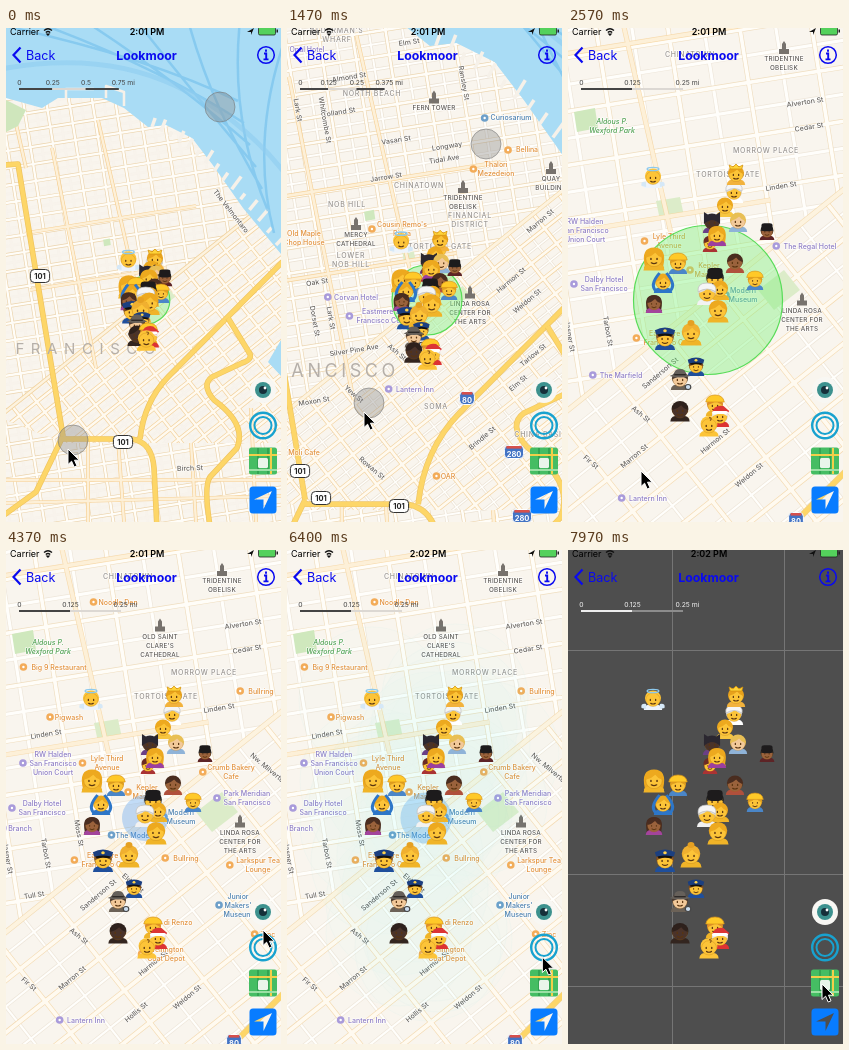
Write an HTML page that moves like this. It is 275x494 px and loops after 8000 ms.

```html
<!DOCTYPE html>
<html lang="en">
<head>
<meta charset="utf-8">
<title>Map pins</title>
<style>
html, body { margin: 0; width: 100%; height: 100%; overflow: hidden; background: #f9f5ee; }
svg { display: block; width: 275px; height: 494px; font-family: Inter, Roboto, "Open Sans", sans-serif; }
.map path { vector-effect: non-scaling-stroke; fill: none; stroke-linejoin: round; }
.map path.area { fill: var(--c); }
.lab text { font-size: 7px; font-weight: 500; text-anchor: middle; paint-order: stroke; stroke: #fffc; stroke-width: 1.4px; stroke-linejoin: round; }
.lab .o { fill: #e2903a; } .lab .p { fill: #8d7cc4; } .lab .s { fill: #66625d; }
.lab .g { fill: #5f5b57; font-size: 6.3px; letter-spacing: .2px; }
.lab .h { fill: #99948f; letter-spacing: .7px; }
.lab .n { fill: #4fa050; font-style: italic; }
.lab .b { fill: #4a7fae; }
.lab .c { fill: #b5afa9; font-size: 15px; letter-spacing: 6.6px; text-anchor: end; stroke: none; font-weight: 400; }
.lab .d { fill: #b5afa9; font-size: 18px; letter-spacing: 3.6px; text-anchor: end; stroke: none; font-weight: 400; }
.lab .shield { font-size: 7.5px; font-weight: 700; stroke: none; }
</style>
</head>
<body>
<svg id="stage" viewBox="0 0 275 494"></svg>
<script>
const stage = document.getElementById('stage');
const LOOP = 8000, CX = 140, CY = 272;

function el(tag, attrs, parent = stage, text) {
  const e = document.createElementNS('http://www.w3.org/2000/svg', tag);
  for (const k in attrs) e.setAttribute(k, attrs[k]);
  if (text !== undefined) e.textContent = text;
  parent.appendChild(e);
  return e;
}
const group = (parent, attrs = {}) => el('g', attrs, parent);
const set = (e, k, v) => e.setAttribute(k, v);
const ramp = (a, b, v) => Math.max(0, Math.min(1, (v - a) / (b - a)));
const about = k => `translate(${CX} ${CY}) scale(${k}) translate(${-CX} ${-CY})`;

// Eased interpolation over rows of [time, ...values]
function track(t, rows) {
  let i = 0;
  while (i < rows.length - 2 && t >= rows[i + 1][0]) i++;
  const [a, b] = [rows[i], rows[i + 1]];
  const u = ramp(a[0], b[0], t), e = u * u * (3 - 2 * u);
  return a.slice(1).map((v, j) => v + (b[j + 1] - v) * e);
}

// ---------- map ----------
const FAR = .32, MID = .47;
const map = group(stage, { class: 'map' });
const roads = [];

function area(d, c, parent) { return el('path', { d, class: 'area', style: `--c:${c}` }, parent); }
function road(d, edge, fill, base, grow, parent, minor) {
  const pair = [el('path', { d, stroke: edge }, parent), el('path', { d, stroke: fill }, parent)];
  roads.push({ pair, base, grow, minor });
}

function northGrid(odd) {
  let d = '';
  for (let k = -26; k < 34; k++) {
    if (!!(k & 1) !== odd) continue;
    const y = 153 + 27 * k, x = 73 + 36 * (k - 2);
    d += `M-330 ${y + 91}L590 ${y - 56}M${x - 141} -600L${x + 113} 990`;
  }
  return d;
}
// Lines along and across the diagonal avenue
function southGrid(odd) {
  let d = '';
  const at = (u, n) => `${(.78 * u + .62 * n).toFixed(1)} ${(.78 * n - .62 * u).toFixed(1)}`;
  for (let k = -20; k < 34; k++) {
    if (!!(k & 1) !== odd) continue;
    const n = 297 + 20.5 * k, u = -182 + 34.5 * k;
    d += `M${at(-900, n)}L${at(700, n)}M${at(u, 290)}L${at(u, 1000)}`;
  }
  return d;
}

const LAND = '#f9f5ee', EDGE = '#ebd3ab', FINE = '#e9dfd0', SOUTH = 'M-320 638L590 -90V719H-116Z';
area('M-900 -900H1200V1400H-900Z', LAND, map);
road(northGrid(true), FINE, '#fffefb', 1, 2.2, map, true);
road(northGrid(false), EDGE, '#fffdf8', 1.7, 2, map);
area(SOUTH, LAND, map);
const clip = el('clipPath', { id: 'south' }, el('defs', {}));
el('path', { d: SOUTH }, clip);
const south = group(map, { 'clip-path': 'url(#south)' });
road(southGrid(true), FINE, '#fffefb', .8, 1.4, south, true);
road(southGrid(false), '#f2cf98', '#fffaf0', 1.9, 2, south);
road('M-320 638L590 -90', '#f0d09a', '#fdf3df', 2, 2.2, map);
area('M6 84l21 -4l3 20l-21 4Z', '#cfe8bd', map);
area('M190 262l26 -20l16 20l-26 20Z', '#dcecc9', map);
area('M88 173l24 -4l4 19l-24 4Z', '#dcecc9', map);

// Streets and shore drawn at the widest zoom
const wide = group(map, { transform: about(1 / FAR) });
road('M10 96L20 140M92 92L128 250M46 120L90 340M20 205L190 178M24 262L160 240M0 452H275M0 475L275 468M82 412V494M112 412L118 494M185 415L190 494M245 380L250 494',
  '#f6cf92', '#fdf0d8', 1.8, 2, wide);
area('M142 83l9 -6l6 9l-8 7Z', '#cfe6bc', wide);
area('M-200 -300H600V520L310 400L275 348L262 334L275 312V226L237 180L206 136L186 110L160 97L142 99L118 80L96 70H52L36 80L0 70L-200 90Z', '#a9dcf5', wide);
area('M0 72L20 82L12 98L0 104Z', '#cfe6bc', wide);
road('M-40 140L12 136L57 408M57 411H126Q146 414 148 440L152 520M57 408L30 464L-20 500M340 170L162 349Q138 374 134 411',
  '#eec25c', '#fdd668', 4, 1, wide);
road('M222 290L244 326Q246 332 236 335L206 349Q195 357 208 372Q241 396 231 420L204 449Q196 460 208 520', '#eec25c', '#fdd668', 4, 1, wide);
let piers = '';
for (let i = 0; i < 15; i++) {
  const u = i / 14, x = 146 + 124 * u, y = 99 + 118 * u * (.5 + .5 * u), r = 9 + 4 * Math.sin(i * 2.3);
  piers += `M${x} ${y}l${r * (.35 + .6 * u)} ${-r}`;
}
el('path', { d: piers, stroke: '#f6f1e9', 'stroke-width': 3.5 }, wide);
el('path', { d: 'M60 70V61H88M100 70V58L118 64V78', stroke: '#f6f1e9', 'stroke-width': 2.5 }, wide);
// Ferry lanes fan out from the shore
let lanes = '';
for (let i = 0; i < 7; i++) lanes += `M${268 - 6 * i} ${205 - 22 * i}Q${238 - 20 * i} ${90 - 12 * i} ${300 - 62 * i} ${-40 + 4 * i}`;
el('path', { d: lanes, stroke: '#7cc4ee', 'stroke-opacity': .75, 'stroke-width': 2.5 }, wide);
el('path', { d: 'M-20 44Q90 20 170 58T300 175', stroke: '#8fcdf0', 'stroke-opacity': .6, 'stroke-width': 5 }, wide);

// ---------- labels: text|x|y|kind|angle ----------
const labelSets = [];
function labels(ref, show, src) {
  const g = group(stage, { class: 'lab' }), items = [];
  for (const row of src.trim().split('\n')) {
    const [text, x, y, kind, rot = 0] = row.trim().split('|');
    const node = group(g), inner = group(node, { transform: `rotate(${rot})` });
    if (kind === 'us' || kind === 'int') {
      const w = text.length * 4.4 + 6, blue = kind === 'int';
      el('rect', { x: -w / 2, y: -6.5, width: w, height: 13, rx: 4, fill: blue ? '#4273c4' : '#fff', stroke: blue ? '#fff' : '#333' }, inner);
      if (blue) el('rect', { x: -w / 2 + 2, y: -6, width: w - 4, height: 2.6, fill: '#d6504c' }, inner);
      el('text', { class: 'shield', y: blue ? 4.5 : 3, fill: blue ? '#fff' : '#222' }, inner, text);
    } else {
      const lines = text.split('/'), top = 2.5 - 4.5 * (lines.length - 1);
      lines.forEach((s, i) => el('text', { class: kind, y: top + 9 * i }, inner, s));
      if (kind === 'g') el('path', { d: `M-5 ${top - 7}v-5h3v-5l2-3l2 3v5h3v5Z`, fill: '#77726d' }, inner);
      if ('opb'.includes(kind)) {
        const w = Math.max(...lines.map(s => s.length)) * 1.85 + 6;
        el('circle', { cx: -w, r: 3.8, fill: { o: '#f3ac59', p: '#a99bdb', b: '#6d9fc9' }[kind] }, inner);
        el('circle', { cx: -w, r: 1.2, fill: '#fff' }, inner);
      }
    }
    items.push({ node, x: (x - CX) / ref, y: (y - CY) / ref });
  }
  labelSets.push({ g, items, show });
}

labels(FAR, (t, s) => 1 - ramp(.355, .40, s), `
FRANCISCO|156|323|c
The Velmontaro|225|183|s|52
Birch St|184|440|s|-2
101|34|248|us
101|117|414|us`);

labels(MID, (t, s) => ramp(.36, .41, s) * (1 - ramp(.6, .72, s)), `
ALDERMAN'S/WHARF|50|7|h
Opal Hotel|20|22|p
Elm St|122|14|s|-9
Almond St|62|49|s|-9
NORTH BEACH|85|66|h
FERN TOWER|147|80|g
Tolland St|52|84|s|-9
Lark St|11|82|s|80
Whitcombe St|38|92|s|80
Vasari St|109|112|s|-9
Ransley St|177|55|s|80
Curiosarium|224|90|b
Bellina|240|122|o
Longway|160|118|s|-9
Tidal Ave|157|131|s|-9
Jarrow St|99|149|s|-9
Thalori/Mezedeion|209|141|o
CHINATOWN|132|158|h
NOB HILL|60|177|h
TRIDENTINE/OBELISK|176|174|g
FINANCIAL/DISTRICT|183|192|h
QUAY/BUILDING|264|155|g
Marron St|253|193|s|-40
Old Maple/Chop House|17|210|o
Cousin Remo's/Pizza|115|201|o
MERCY/CATHEDRAL|69|211|g
TORTOISE GATE|153|219|h
LOWER/NOB HILL|64|232|h
Oak St|30|254|s|-9
Corvan Hotel|69|269|p
Eastmere San/Francisco Centre|98|288|p
Dorset St|28|293|s|80
Lark St|44|290|s|80
Harmon St|224|252|s|-40
Weldon St|240|273|s|-40
Tarlow St|246|327|s|-40
LINDA ROSA/CENTER FOR/THE ARTS|183|284|g
Silver Pine Ave|67|322|s|-9
Ash St|110|324|s|40
Elm St|231|355|s|-40
FRANCISCO|112|346|d
Lantern Inn|128|361|p
Yew St|67|366|s|40
Moxon St|27|373|s|-9
SOMA|149|378|h
Brindle St|195|410|s|-40
CHINA BASIN|254|406|h
Moli Cafe|17|424|o
Rowan St|85|440|s|40
OAR|161|448|o
80|180|370|int
280|227|424|int
280|235|488|int
101|13|443|us
101|34|470|us
101|112|478|us`);

const near = (t, s) => ramp(.72, .9, s);
labels(1, near, `
CHINATOWN|122|26|h
TRIDENTINE/OBELISK|216|35|g
Alverton St|237|74|s|-9
Cedar St|241|99|s|-9
MORROW PLACE|198|122|h
TORTOISE GATE|160|146|h
Linden St|213|158|s|-9
Kepler/Marlowe|141|242|o
Modern/Museum|175|267|b
LINDA ROSA/CENTER FOR/THE ARTS|234|291|g
Tarbot St|40|303|s|80
Jasper St|2|308|s|80
Sanderson St|92|345|s|-40
Ash St|73|386|s|40
Fir St|23|434|s|40
Marron St|66|428|s|-40
Harmon St|147|413|s|-40
Weldon St|181|447|s|-40
Lantern Inn|80|470|p
80|228|491|int`);

labels(1, (t, s) => near(t, s) * (1 - ramp(2650, 3200, t)), `
Aldous P./Wexford Park|44|98|n
RW Halden/San Francisco/Union Court|17|202|p
Dalby Hotel/San Francisco|36|256|p
Lyle Third/Avenue|101|213|o
The Regal Hotel|242|218|p
Eastmere San/Francisco Centre|104|310|o
The Marfield|53|347|p`);

labels(1, t => ramp(2650, 3200, t), `
Aldous P./Wexford Park|42|97|n
Noodle Den|112|52|o
OLD SAINT/CLARE'S/CATHEDRAL|154|95|g
Big 9 Restaurant|53|117|o
Pigwash|63|167|o
Bullring|255|141|o
Linden St|40|184|s|-9
Lyle Third/Avenue|101|213|o
RW Halden/San Francisco/Union Court|47|213|p
Crumb Bakery/Cafe|225|222|o
Nw. Milverton|263|219|s|40
Dalby Hotel/San Francisco|36|258|p
Park Meridian/San Francisco|241|248|p
Branch|14|278|p
Moss St|73|283|s|80
The Modern|130|285|b
Bullring|180|308|o
Eastmere San/Francisco Centre|104|310|o
Larkspur Tea/Lounge|252|315|o
Elder St|127|333|s|40
Tull St|28|345|s|-9
Junior/Makers'/Museum|232|355|b
di Renzo|172|372|o
Zinc|262|384|o
Wellington/Coat Depot|160|404|o
Hollis St|130|462|s|-40`);

// ---------- people ----------
const skinTone = { y: '#fcc438', d: '#4a332a', m: '#9a623c', l: '#f2c99a' };
const people = [
  [85, 150, 1, 'y', '#fcc438', '#eef4fb', 'halo'], [166, 165, 1, 'y', '#ddd', '#fff', 'turban'],
  [168, 147, 1, 'y', '#e8a21c', '#f2b23c', 'crown'], [157, 179, 1, 'y', '#eda91f', '#f7c640', ''],
  [144, 195, 1, 'd', '#2b2730', '#6a3f86', 'cat'], [170, 194, 1, 'l', '#e8bf55', '#8fb3d8', ''],
  [142, 216, .8, 'y', '#6b2b25', '#a33', 'dome'], [149, 208, 1, 'y', '#eda91f', '#9b3fa0', 'long'],
  [199, 204, .8, 'm', '#222', '#5d2426', 'guard'], [86, 231, 1.15, 'y', '#eda91f', '#f0b428', 'long'],
  [110, 236, 1, 'y', '#e0a020', '#4a86c8', 'helmet'], [95, 255, 1, 'y', '#eda91f', '#2d76c8', 'arms'],
  [167, 235, 1, 'm', '#4a2d20', '#b0503c', ''], [187, 253, .9, 'y', '#e0a020', '#4a86c8', 'helmet'],
  [147, 252, 1.1, 'y', '#222', '#b5282d', 'guard'], [152, 262, 1, 'y', '#eda91f', '#f0b428', ''],
  [139, 266, 1.1, 'y', '#ddd', '#f2f2f2', 'turban'], [150, 283, 1.15, 'y', '#eda91f', '#f0b428', ''],
  [86, 276, .9, 'm', '#4a2d20', '#a3449c', 'long'], [97, 311, 1.1, 'y', '#7a4a20', '#1f4f9c', 'police'],
  [123, 306, 1.15, 'y', '#f0b030', '#f0b428', 'bun'], [128, 339, .9, 'y', '#7a4a20', '#1f4f9c', 'police'],
  [112, 352, 1, 'l', '#4a3a30', '#6c6257', 'fedora'], [112, 383, 1.05, 'd', '#2e211c', '#33251f', ''],
  [147, 378, 1, 'y', '#e0902a', '#f0b428', 'helmet'], [152, 389, 1, 'y', '#eee', '#d33', 'santa'],
  [141, 398, 1.05, 'y', '#fcc438', '#fcc438', 'baby']
];
const hats = {
  halo: '<ellipse cy="-9" rx="5" ry="1.6" fill="none" stroke="#8cc9ee" stroke-width="1.4"/><path d="M-6 4q-5-1-4 4l4 1zM6 4q5-1 4 4l-4 1z" fill="#d5e8f7"/>',
  turban: '<path d="M-7-2Q-8-10 0-10T7-2Q0-7-7-2Z" fill="#f5f5f5" stroke="#bbb" stroke-width=".6"/>',
  crown: '<path d="M-5-6l-1-4 3.500 2 2.500-3 2.500 3 3.500-2-1 4Z" fill="#ffd43a" stroke="#d4920c" stroke-width=".7"/>',
  cat: '<path d="M-7 1V-11l4 3h6l4-3V1Q0-7-7 1Z" fill="#2b2730"/>',
  dome: '<path d="M-7-3Q-7-10 0-10T7-3Z" fill="#6b2b25"/>',
  guard: '<rect x="-6" y="-11" width="12" height="10" rx="3" fill="#1d1b1c"/>',
  helmet: '<path d="M-8-4H8Q7-11 0-11T-8-4Z" fill="#ffc928" stroke="#d9941a" stroke-width=".7"/>',
  police: '<path d="M-7-4L-8-8Q0-13 8-8L7-4Z" fill="#1b3f80"/><path d="M-6-4q6-2 12 0l-1 1.500q-5-1-10 0Z" fill="#111"/><circle cy="-7.500" r="1.400" fill="#ffd34d"/>',
  fedora: '<path d="M-9-4Q0-1 9-4L5-6Q5-11 0-11T-5-6Z" fill="#66605a"/><path d="M-5-6h10v1.400H-5Z" fill="#2e2a28"/><circle cx="7" cy="7" r="2.400" fill="#cde" stroke="#444"/>',
  santa: '<path d="M-7-4Q-5-13 3-11L8-6 6-3Z" fill="#dc3535"/><rect x="-7" y="-6" width="14" height="3" rx="1.500" fill="#fff"/>',
  bun: '<circle cy="-9.500" r="2.600" fill="#e5a022"/>',
  arms: '<path d="M-6 8Q-12 2-3-10M6 8Q12 2 3-10" fill="none" stroke="#2d76c8" stroke-width="2.600"/>',
  baby: '<path d="M0-8q3 0 1 3" fill="none" stroke="#8a5a1c"/>'
};
function person(parent, [, , k, skin, hair, shirt, hat]) {
  const g = group(parent), p = group(g, { transform: `scale(${k * 1.15} ${k})` });
  if (hat === 'long') el('path', { d: 'M-7 6Q-10-10 0-10T7 6Q9 9 5 8H-5Q-9 9-7 6Z', fill: hair }, p);
  el('path', { d: 'M-8 10Q-8 4 0 4T8 10Z', fill: shirt }, p);
  el('ellipse', { cy: -2, rx: 7, ry: 7.6, fill: hair }, p);
  el('ellipse', { cy: -.2, rx: 6.2, ry: 6.8, fill: skinTone[skin], stroke: '#a8660e', 'stroke-opacity': .35, 'stroke-width': .6 }, p);
  if (hat !== 'halo' && hat !== 'baby') el('path', { d: 'M-6.3-1Q-6-8.5 0-8.5T6.3-1Q3-2 1-5.5Q-2-2-6.3-1Z', fill: hair }, p);
  el('path', { d: 'M-2.3-.6v1M2.3-.6v1M-2 3.3Q0 4.8 2 3.3', stroke: '#5a3510', 'stroke-width': 1.1, 'stroke-linecap': 'round', fill: 'none' }, p);
  if (hats[hat]) group(p).innerHTML = hats[hat];
  return g;
}

// ---------- overlays ----------
const green = el('circle', { cx: CX, cy: CY, fill: '#78f078', 'fill-opacity': .4, stroke: '#58dc58', 'stroke-width': 1.2 });
const blue = el('circle', { cx: 139, cy: 268, fill: '#5fa4ee', 'fill-opacity': .38 });
const rings = group(stage);
for (const [x, y] of people)
  el('circle', { cx: x, cy: y, r: 73, fill: '#00f6f6', 'fill-opacity': .135, stroke: '#00c4cc', 'stroke-opacity': .45, 'stroke-width': .8 }, rings);
const dark = group(stage);
el('rect', { width: 275, height: 494, fill: '#4e4e4e' }, dark);
el('path', { d: 'M104.5 0V494M216.5 0V494M0 100.5H275M0 324.5H275M0 436.5H275', stroke: '#757575' }, dark);
const pins = people.map(p => person(stage, p));

// ---------- interface ----------
const ui = group(stage), BLUE = '#0a0af0';
const bar = group(ui);
const segs = [0, 1, 2].map(() => el('rect', { y: 60, height: 2 }, bar));
const ticks = [0, 1, 2, 3].map(() => el('text', { y: 57, 'font-size': 6.8, 'text-anchor': 'middle' }, bar));
el('text', { x: 4, y: 7, 'font-size': 9 }, ui, 'Carrier');
el('path', { d: 'M38 2.5Q42-1 46 2.5M39.8 4.5Q42 2.6 44.2 4.5M41.2 6.2L42 7l.8-.8Z', fill: 'none', stroke: '#111', 'stroke-width': 1.3 }, ui);
const clock = el('text', { x: 141, y: 7, 'font-size': 9, 'font-weight': 600, 'text-anchor': 'middle' }, ui);
el('path', { d: 'M241 4L248 0L245 7V4Z', fill: '#111' }, ui);
el('rect', { x: 252.5, y: -1, width: 17, height: 8, rx: 1.5, fill: '#54d15c', stroke: '#222', 'stroke-width': .8 }, ui);
el('rect', { x: 270.5, y: 1.5, width: 1.5, height: 3, fill: '#222' }, ui);
el('path', { d: 'M14.5 19.5L7.5 27L14.5 34.5', fill: 'none', stroke: BLUE, 'stroke-width': 2.2 }, ui);
el('text', { x: 20, y: 32, 'font-size': 12.6, fill: BLUE }, ui, 'Back');
el('text', { x: 140.5, y: 32, 'font-size': 12.3, 'font-weight': 700, fill: BLUE, 'text-anchor': 'middle' }, ui, 'Lookmoor');
el('circle', { cx: 260, cy: 27, r: 8.3, fill: 'none', stroke: BLUE, 'stroke-width': 1.5 }, ui);
el('path', { d: 'M260 21.5v2.2M258 25.5h2.2v5.8M257.5 31.4h5', fill: 'none', stroke: BLUE, 'stroke-width': 1.9 }, ui);

el('circle', { cx: 257, cy: 362, r: 13, fill: '#f8f7f3' }, ui);
el('circle', { cx: 257, cy: 362, r: 8, fill: '#3c918e' }, ui);
el('circle', { cx: 257, cy: 362, r: 4, fill: '#16303a' }, ui);
el('circle', { cx: 259, cy: 360, r: 1.4, fill: '#fff' }, ui);
for (const [r, w] of [[12.8, 2.4], [8.5, 2]])
  el('circle', { cx: 257, cy: 397.5, r, fill: 'none', stroke: '#18a2cf', 'stroke-width': w }, ui);
el('rect', { x: 243, y: 419.5, width: 28, height: 27, rx: 2.5, fill: '#45bd63' }, ui);
el('path', { d: 'M252 420v26M262 420v26', stroke: '#2f9a4e', 'stroke-width': 1.5 }, ui);
el('path', { d: 'M243 427H271M265 420V446', stroke: '#f2cf4a', 'stroke-width': 2 }, ui);
el('path', { d: 'M243 442H271', stroke: '#9be0a5', 'stroke-width': 2 }, ui);
el('rect', { x: 252, y: 430, width: 10, height: 10, rx: 1.5, fill: '#e9f5ea' }, ui);
el('path', { d: 'M247 458.5h20q3.5 0 3.5 3.5v20q0 3.5-3.5 3.5h-20q-3.5 0-3.5-3.5v-20q0-3.5 3.5-3.5ZM266 463L248 471.5H257.5V481Z', fill: '#087cff', 'fill-rule': 'evenodd' }, ui);

const touches = [0, 1].map(() => el('circle', { r: 15, fill: '#8a8a8a', 'fill-opacity': .38, stroke: '#777', 'stroke-opacity': .6 }, ui));
const cursor = el('path', { d: 'M0 0V15.5L3.6 12.2L6.2 18L9 16.8L6.5 11.2H11.3Z', fill: '#000', stroke: '#fff', 'stroke-width': 1 }, ui);

// ---------- motion ----------
const zoomKeys = [[0, Math.log(.32)], [590, Math.log(.345)], [830, Math.log(.345)], [1470, Math.log(.47)], [2400, 0]];
const touchKeys = [[0, 67, 412], [590, 98, 338], [830, 98, 338], [1470, 82, 375], [2400, 78, 434]];
const cursorKeys = [[2400, 73, 443], [2600, 73, 443], [3260, 256, 359], [3300, 256, 361], [3880, 256, 361], [4370, 257, 380],
  [4650, 257, 388], [6160, 257, 388], [6920, 250, 468], [7400, 254, 434], [8000, 254, 434]];

function scaleBar(s, night) {
  const [step, names] = s < .4 ? [104 * s, ['0', '0.25', '0.5', '0.75 mi']]
    : s < .7 ? [60 * s, ['0', '0.125', '0.25', '0.375 mi']]
    : [51 * s, ['0', '0.125', '0.25 mi']];
  const lit = night > .5;
  ticks.forEach((e, i) => {
    e.textContent = names[i] || '';
    set(e, 'x', 13.5 + step * i + (i && i === names.length - 1 ? 4 : 0));
    set(e, 'fill', lit ? '#f4f4f4' : '#444');
  });
  segs.forEach((e, i) => {
    set(e, 'x', 13 + step * i);
    set(e, 'width', i < names.length - 1 ? step : 0);
    set(e, 'fill', i & 1 ? (lit ? '#8c8c8c' : '#dcd8d3') : (lit ? '#eee' : '#444'));
  });
}

function draw(t) {
  const s = Math.exp(track(t, zoomKeys)[0]);
  const night = ramp(7780, 7950, t);
  set(map, 'transform', about(s));
  for (const { pair, base, grow, minor } of roads) {
    const w = base + grow * s, seen = minor ? ramp(.3, .46, s) : 1;
    set(pair[0], 'stroke-width', w + 1.3);
    set(pair[1], 'stroke-width', w);
    set(pair[0], 'opacity', seen * (1.1 - .4 * s));
    set(pair[1], 'opacity', seen);
  }
  for (const { g, items, show } of labelSets) {
    const o = show(t, s);
    set(g, 'opacity', o);
    set(g, 'display', o > 0 ? 'inline' : 'none');
    if (o > 0) for (const i of items) set(i.node, 'transform', `translate(${CX + i.x * s} ${CY + i.y * s})`);
  }
  pins.forEach((g, i) => set(g, 'transform', `translate(${CX + (people[i][0] - CX) * s} ${CY + (people[i][1] - CY) * s})`));

  set(green, 'r', 74.5 * s);
  set(green, 'opacity', t < 3610 ? 1 : 0);
  const fence = ramp(4700, 5000, t) * (1 - ramp(6160, 6420, t));
  set(rings, 'opacity', fence);
  set(blue, 'r', 29 - 6 * Math.sin((t - 7450) / 1760 * 2 * Math.PI));
  set(blue, 'opacity', t < 3610 ? 0 : 1 - fence);
  set(dark, 'opacity', night);

  scaleBar(s, night);
  clock.textContent = t < 5810 ? '2:01 PM' : '2:02 PM';
  const [x, y] = track(t, touchKeys);
  const held = t < 2430;
  touches.forEach((e, i) => {
    set(e, 'cx', i ? 281 - x : x);
    set(e, 'cy', i ? 491 - y : y);
    set(e, 'opacity', held ? 1 : 0);
  });
  const [cx, cy] = t < 2400 ? [x - 5, y + 9] : track(t, cursorKeys);
  set(cursor, 'transform', `translate(${cx} ${cy})`);
}

const start = performance.now();
function tick() {
  draw((performance.now() - start) % LOOP);
  requestAnimationFrame(tick);
}
draw(0);
requestAnimationFrame(tick);
</script>
</body>
</html>
```
